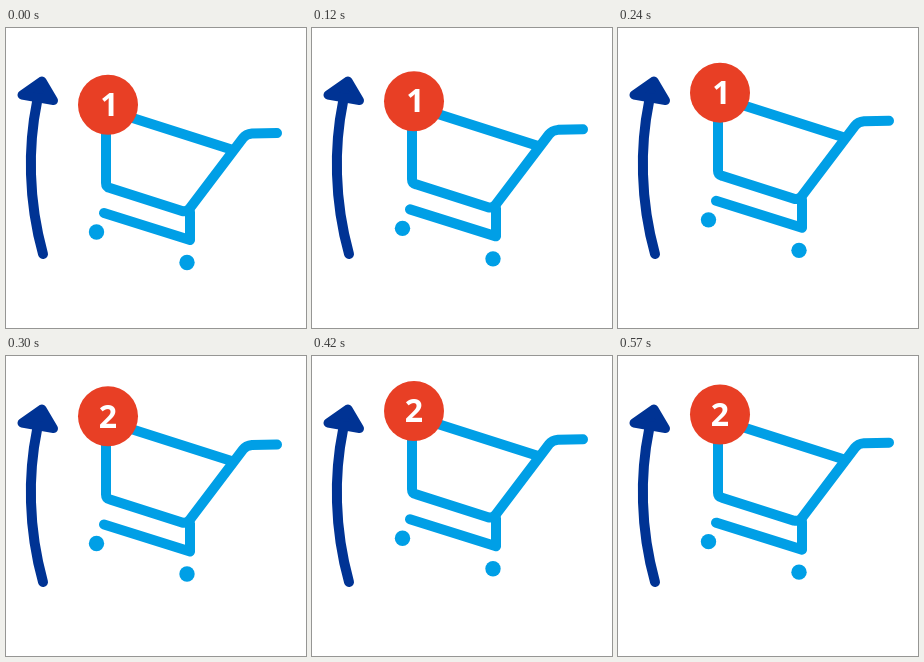
Write an HTML page that moves like this. It is 300x300 px and loops after 600 ms.

```html
<!DOCTYPE html>
<html lang="en">
<head>
<meta charset="utf-8">
<title>Cart counter</title>
<style>
  html, body { margin: 0; width: 100%; height: 100%; overflow: hidden; background: #fff; }
  svg { display: block; width: 100vw; height: 100vh; }
  .line { fill: none; stroke-width: 10; stroke-linecap: round; stroke-linejoin: round; }
  .navy { stroke: #003394; }
  .sky { stroke: #009fe6; }
  .wheel { fill: #009fe6; }
  .badge { fill: #e83f25; }
  text { font: 700 32px "Open Sans", "Noto Sans", sans-serif; fill: #fff; text-anchor: middle; }
</style>
</head>
<body>
<svg viewBox="0 0 300 300">
  <g class="navy">
    <path class="line" d="M31 74 C22 118 22 172 37 226"/>
    <path d="M36 53 L16 67 L47.5 72.5 Z" fill="#003394" stroke-width="9" stroke-linejoin="round"/>
  </g>
  <g id="cart">
    <g class="line sky">
      <path d="M100 77 V155 Q100 159 104 160 L176 183 Q181 184 184 180 L237 110 Q240 106 246 105.5 L271 105"/>
      <path d="M100 81.5 L227 122"/>
      <path d="M98 185 L184 212 V184"/>
    </g>
    <circle class="wheel" cx="90.5" cy="204" r="7.7"/>
    <circle class="wheel" cx="181" cy="234.5" r="7.7"/>
    <circle class="badge" cx="102" cy="76.8" r="30"/>
    <text id="count" y="88"></text>
  </g>
</svg>
<script>
  const LOOP = 600, STEP = 30, SWING = 900, LIFT = 11;
  const cart = document.getElementById("cart");
  const count = document.getElementById("count");

  function draw(now) {
    const t = Math.floor((now % LOOP) / STEP) * STEP;
    const y = -LIFT * (1 - Math.cos(2 * Math.PI * t / SWING));
    const second = t >= LOOP / 2;
    cart.setAttribute("transform", `translate(0 ${y.toFixed(2)})`);
    count.textContent = second ? "2" : "1";
    count.setAttribute("x", second ? 102 : 103.5);
  }

  const start = performance.now();
  function tick() {
    draw(performance.now() - start);
    requestAnimationFrame(tick);
  }
  tick();
</script>
</body>
</html>
```
